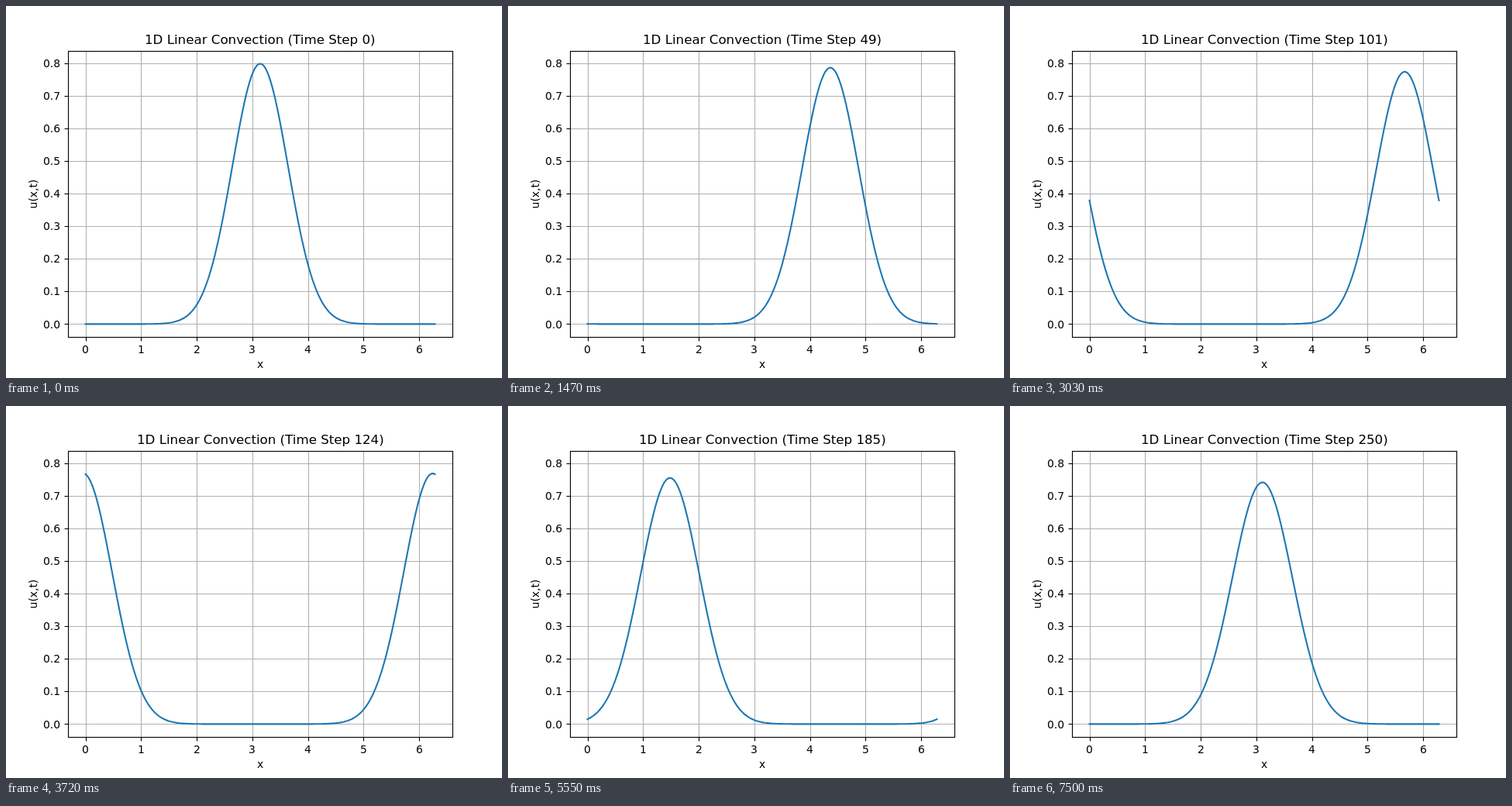
These frames come from a looping animation (640 by 480 pixels, 7.53 s). An HTML page with a canvas:

```html
<!DOCTYPE html>
<html lang="en">
<head>
<meta charset="utf-8">
<title>1D Linear Convection</title>
<style>
  html, body { margin: 0; width: 100%; height: 100%; overflow: hidden; background: #fff; }
  canvas { display: block; }
</style>
</head>
<body>
<canvas id="plot" width="640" height="480"></canvas>
<script>
const ctx = document.getElementById('plot').getContext('2d');
const STEP_MS = 30, STEPS = 251;
const N = 201, SPAN = 2 * Math.PI, DX = SPAN / (N - 1), DT = 0.025;
const SIGMA = 0.5, PEAK = 1 / (SIGMA * Math.sqrt(2 * Math.PI));
const BOX = { left: 80, right: 576, top: 57.6, bottom: 427.2 };
const FONT = '"DejaVu Sans", sans-serif';
const PT = 100 / 72;

// The data fills the box minus a margin of 1/22 on each side.
const dataW = (BOX.right - BOX.left) / 1.1;
const dataH = (BOX.bottom - BOX.top) / 1.1;
const px = x => BOX.left + dataW * (0.05 + x / SPAN);
const py = u => BOX.bottom - dataH * (0.05 + u / PEAK);
const snap = v => Math.floor(v + 0.5) + 0.5;

// Upwind scheme with periodic ends.
function solve() {
  let u = Array.from({ length: N }, (_, i) =>
    PEAK * Math.exp(-((i * DX - Math.PI) ** 2) / (2 * SIGMA ** 2)));
  const waves = [u];
  const cfl = DT / DX;
  while (waves.length < STEPS) {
    const prev = u;
    u = prev.map((v, i) => v - cfl * (v - prev[i ? i - 1 : N - 2]));
    waves.push(u);
  }
  return waves;
}
const waves = solve();

function line(x1, y1, x2, y2, color) {
  ctx.strokeStyle = color;
  ctx.beginPath();
  ctx.moveTo(x1, y1);
  ctx.lineTo(x2, y2);
  ctx.stroke();
}

function text(str, x, y, size, align) {
  ctx.font = `${size * PT}px ${FONT}`;
  const w = ctx.measureText(str).width;
  ctx.fillText(str, Math.round(align === 'right' ? x - w : x - w / 2), y);
}

function drawAxes(grid) {
  const l = snap(BOX.left), r = snap(BOX.right);
  const t = snap(BOX.top), b = snap(BOX.bottom);
  ctx.lineWidth = 0.8 * PT;
  ctx.lineCap = 'butt';
  for (let i = 0; i <= 6; i++) {
    const x = snap(px(i));
    if (grid) line(x, t, x, b, '#b0b0b0');
    else {
      line(x, b, x, b + 5, '#000');
      text(String(i), px(i), 448, 10);
    }
  }
  for (let i = 0; i <= 8; i++) {
    const y = snap(py(i / 10));
    if (grid) line(l, y, r, y, '#b0b0b0');
    else {
      line(l, y, l - 5, y, '#000');
      text((i / 10).toFixed(1), 70.3, Math.round(py(i / 10) + 5.1), 10, 'right');
    }
  }
  if (!grid) ctx.strokeRect(l, t, r - l, b - t);
}

function drawWave(u) {
  ctx.strokeStyle = '#1f77b4';
  ctx.lineWidth = 1.5 * PT;
  ctx.lineCap = 'square';
  ctx.lineJoin = 'round';
  ctx.beginPath();
  u.forEach((v, i) => ctx.lineTo(px(i * DX), py(v)));
  ctx.stroke();
}

function drawLabels(step) {
  const midX = (BOX.left + BOX.right) / 2;
  text(`1D Linear Convection (Time Step ${step})`, midX, 49, 12);
  text('x', midX, 467, 10);
  ctx.save();
  ctx.translate(40, (BOX.top + BOX.bottom) / 2);
  ctx.rotate(-Math.PI / 2);
  text('u(x,t)', 0, 0, 10);
  ctx.restore();
}

function draw(step) {
  ctx.fillStyle = '#fff';
  ctx.fillRect(0, 0, 640, 480);
  ctx.fillStyle = '#000';
  ctx.lineJoin = 'miter';
  drawAxes(true);
  drawWave(waves[step]);
  ctx.lineJoin = 'miter';
  drawAxes(false);
  drawLabels(step);
}

function tick() {
  draw(Math.floor(performance.now() / STEP_MS) % STEPS);
  requestAnimationFrame(tick);
}
tick();
</script>
</body>
</html>
```
